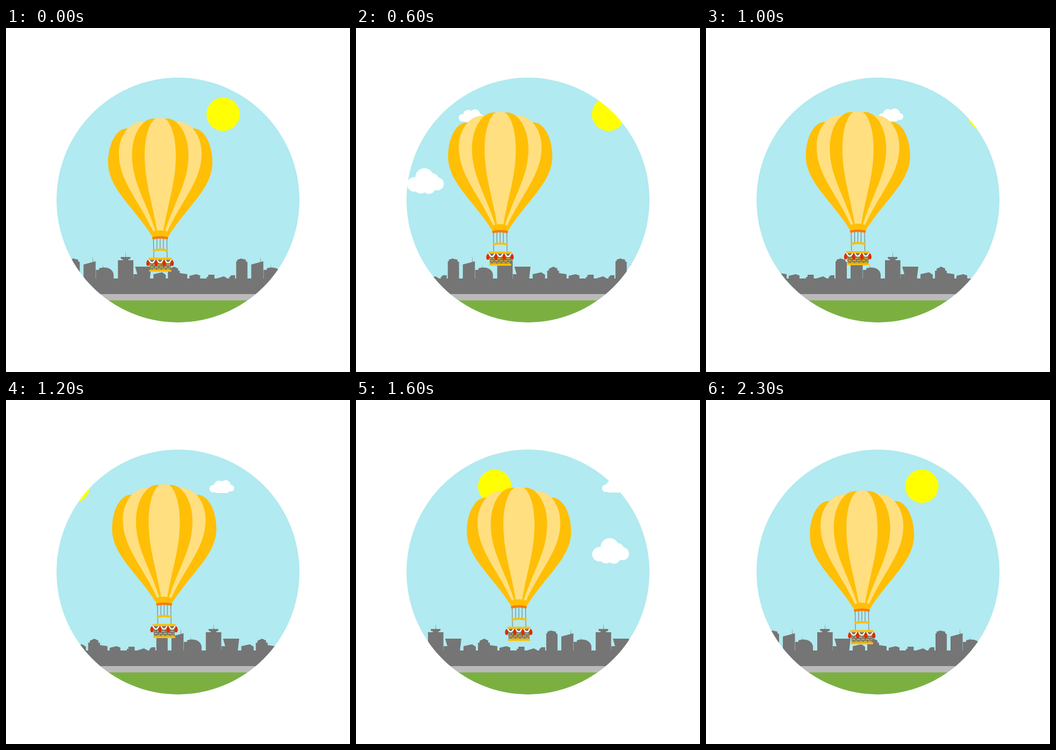
Recreate the animation shown at these times as an HTML page. Size 640 by 640 pixels, loop 2400 ms.

```html
<!DOCTYPE html>
<html lang="en">
<head>
<meta charset="utf-8">
<title>Balloon over the city</title>
<style>
html, body { margin: 0; width: 100%; height: 100%; overflow: hidden; background: #fff; }
svg { display: block; width: 100vw; height: 100vh; }
</style>
</head>
<body>
<svg viewBox="0 0 640 640">
  <defs>
    <clipPath id="disc"><ellipse cx="320" cy="320" rx="226" ry="227.7"/></clipPath>
    <path id="spike" d="M-0.8 20L0 0L0.8 20Z"/>
    <g id="block">
      <!-- stepped tower, sail and dome -->
      <path d="M116 470V434H118V431L125 429L134 431V434L137 435.5V470Z"/>
      <path d="M144 470V440L166.5 434V470Z"/>
      <path d="M167 470V450H173V447L180 445.5Q197 445 200 458V470Z"/>
      <!-- tower with a deck, then the flared block -->
      <path d="M208 470V432H217V430H214L213 426H231.5L230.5 430H227.5V432H236.7V470Z"/>
      <path d="M237 458H244L240 444H270L267 470H237Z"/>
      <!-- low houses -->
      <path d="M274 470V458L290 454.5L297 459V470Z"/>
      <path d="M301 470V451.5H304V448L312.5 444L320 447.5V451.5H323V456L337 458V470Z"/>
      <path d="M341 470V461L354 458L361 460.5V470Z"/>
      <path d="M373 470V463H376V459H387.5V470Z"/>
      <path d="M392 466L405 462L412 466ZM415 470V464L419 460H426V470Z"/>
      <use href="#spike" x="125" y="425"/>
      <use href="#spike" x="161.500" y="424"/>
      <use href="#spike" x="180" y="439"/>
      <use href="#spike" x="222.500" y="415"/>
    </g>
  </defs>
  <g clip-path="url(#disc)">
    <rect x="90" y="90" width="460" height="460" fill="#b1eaf0"/>
    <circle id="sun" cy="160.500" r="31" fill="#ff0"/>
    <g id="small" fill="#fff">
      <circle cx="-39" cy="1" r="7"/><circle cx="-28" cy="-4" r="10"/>
      <circle cx="-16" cy="-5" r="10"/><circle cx="-6" cy="0" r="6.200"/>
      <rect x="-38" y="-4" width="30" height="13" rx="6"/>
    </g>
    <g id="big" fill="#fff">
      <circle cx="-19" cy="0" r="13.500"/><circle cx="0" cy="-13" r="17"/>
      <circle cx="14" cy="-8" r="13"/><circle cx="24" cy="-1" r="12"/>
      <circle cx="-7" cy="5" r="12"/><circle cx="8" cy="5" r="12.500"/>
    </g>
    <g id="city" fill="#757575">
      <use href="#block" x="-312"/><use href="#block"/><use href="#block" x="312"/>
      <rect x="-400" y="466" width="1200" height="30"/>
    </g>
    <rect x="90" y="495" width="460" height="12" fill="#bababa"/>
    <rect x="90" y="506.800" width="460" height="44" fill="#7bb041"/>
  </g>
  <g id="balloon">
    <g id="envelope"></g>
    <path d="M270.500 379Q287 373 303.500 379L301 390H273Z" fill="#ffbf06"/>
    <g fill="none">
      <path d="M274.500 392L275.200 427M281 391V412M287 391V412M293 391V412M299.500 392L300 427" stroke="#757575"/>
      <path d="M272.500 391Q287 387.500 301.500 391" stroke="#f57c0a" stroke-width="4.500"/>
      <path d="M273.500 413.800Q287.500 410.500 301.500 413.800" stroke="#ffbf06" stroke-width="4"/>
    </g>
    <path d="M267 430H308L306.500 450H268Z" fill="#757575"/>
    <g stroke="#ffbf06" stroke-width="1.500" stroke-dasharray="6 2.500">
      <path d="M269 436.500H306M269 444.500H306"/>
      <path d="M269 440.500H306M269 448H306" stroke-dashoffset="4"/>
    </g>
    <g fill="#ffbf06">
      <rect x="265.500" y="427" width="43" height="4" rx="1.500"/>
      <rect x="266.500" y="449.600" width="41.500" height="3.800" rx="1.500"/>
    </g>
    <g id="trim"></g>
  </g>
</svg>
<script>
const $ = id => document.getElementById(id);
const LOOP = 2400, STEP = 100, TICKS = 60, MID = 287.2, REPEAT = 312;
const AMBER = '#ffbf06', CREAM = '#ffdf80';

const ease = x => x * x * (3 - 2 * x);

// One side of a gore: flat top, swelling to its widest, then narrowing to the neck.
function side(s, { top, y, wide, at, neck, end }) {
  const x = w => MID + s * w;
  const drop = k => at + (end - at) * k;
  return `M${MID} ${y}H${x(top)}` +
    `C${x((top + wide) / 2)} ${y - 2} ${x(wide)} ${at - (at - y) * 0.6} ${x(wide)} ${at}` +
    `C${x(wide)} ${drop(0.35)} ${x(wide + (neck - wide) * 0.56)} ${drop(0.58)} ${x(neck)} ${end}H${MID}Z`;
}

const gores = [
  { fill: AMBER, top: 61, y: 187, wide: 97, at: 250, neck: 14, end: 389 },
  { fill: CREAM, top: 32, y: 174.5, wide: 77, at: 233, neck: 13, end: 379 },
  { fill: AMBER, top: 11, y: 168.5, wide: 52.5, at: 236, neck: 8.5, end: 379 },
  { fill: CREAM, top: 3, y: 167.5, wide: 29, at: 236, neck: 5.5, end: 379 }
];
$('envelope').innerHTML = gores.map(g =>
  `<path fill="${g.fill}" d="${side(-1, g)}${side(1, g)}"/>`).join('');

// Four sandbags with a garland hung between each pair.
let bags = '', garland = 'M266 430.5';
for (let i = 0; i < 4; i++) {
  const x = 264.3 + 15 * i;
  bags += `M${x} 431c4 3 4 11.5 0 11.5s-4 -8.5 0 -11.5Z`;
  if (i < 3) garland += `M${x + 2} 431q5.5 11 11 0`;
}
$('trim').innerHTML = `<path d="${bags}" fill="#dd2c00"/>
  <path d="${garland}" fill="none" stroke="#fff" stroke-width="2.2"/>`;

// Balloon drift: evenly spaced points of a closed, smooth path.
const drift = [[1, 0.6], [-13.5, -7.3], [-18.3, -12.7], [5.5, -10.7], [16, -5.7], [8.5, -0.7]];

function along(points, phase) {
  const n = points.length, i = Math.floor(phase * n), u = phase * n - i, w = 1 - u;
  const [a, b, c, d] = [-1, 0, 1, 2].map(k => points[(i + k + n) % n]);
  return [0, 1].map(k => b[k] + (c[k] - b[k]) * ease(u) +
    u * w * (w * (c[k] - a[k]) - u * (d[k] - b[k])) / 2);
}

// Clouds cross the sky fastest at the middle of their way.
const cross = (mid, reach, f, when, span) => mid + reach * Math.tanh((f - when) / span);

// The sun leaves on the right and later returns from the left to the same place.
const sunX = f => f < 30
  ? 403.6 + 120.5 * ease(f / 30)
  : 403.6 - 450 * (1 - ease((f - 10) / 50));

const move = (id, x, y) => $(id).setAttribute('transform', `translate(${x.toFixed(2)} ${y.toFixed(2)})`);

function draw(ms) {
  // The motion runs on 60 ticks per loop and shows every 100 ms.
  const f = Math.floor(TICKS * STEP / LOOP * Math.floor(ms % LOOP / STEP) + 1);
  const smallX = cross(302, 265, f, 21, 20);
  const bigX = cross(315, 288, f, 30, 18);
  $('sun').setAttribute('cx', sunX(f).toFixed(2));
  move('small', smallX, 169 - smallX * 0.0115);
  move('big', bigX, 292.5 - bigX * 0.0115);
  move('city', REPEAT * ease(f / TICKS), 0);
  move('balloon', ...along(drift, f / TICKS));
}

function tick(now) {
  draw(Math.max(now, 0));
  requestAnimationFrame(tick);
}

draw(0);
requestAnimationFrame(tick);
</script>
</body>
</html>
```
